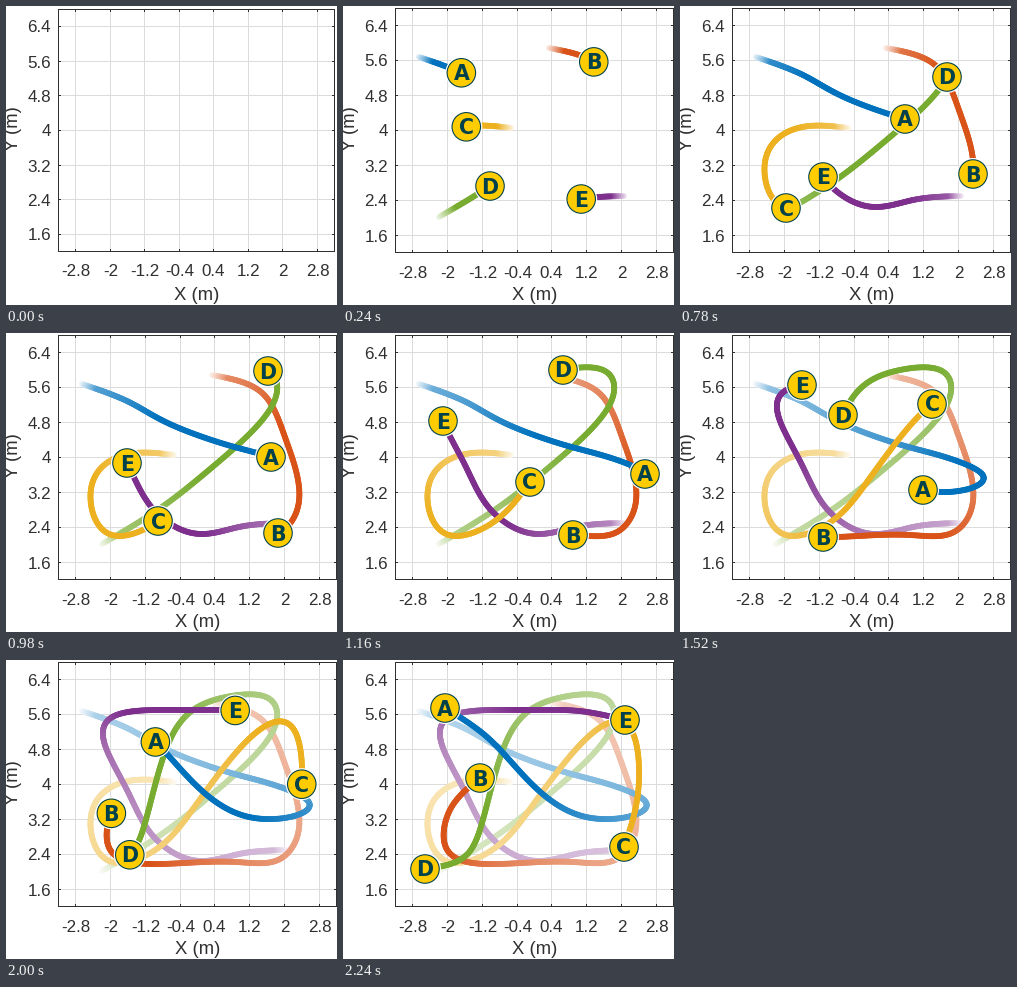
A matplotlib script that plays this animation: 331x299 px, repeating every 2300 ms.

```python
import numpy as np
import matplotlib.pyplot as plt
from matplotlib.animation import FuncAnimation
from matplotlib.collections import LineCollection
from matplotlib.colors import to_rgb
from matplotlib.patches import Circle

W, H, DPI = 331, 299, 64
PT = 72 / DPI  # points per pixel
TICK_MS, FRAMES = 20, 115
SAMPLES = 8  # trail samples per step
INK, TEAL, YELLOW = "#303030", "#00414b", "#ffcc00"

# Every robot passes its waypoints (in pixels) at these steps.
STEPS = np.array([0, 4.5, 9, 13, 16, 19, 25, 30, 33.5, 37])
ROBOTS = {
    "A": ("#0072bd", [(76, 51), (123, 69), (166, 92), (225, 113), (265, 124),
                      (302, 141), (243, 157), (180, 115), (144, 77), (102, 48)]),
    "B": ("#d95319", [(206, 42), (255, 59), (280, 107), (293, 168), (272, 200),
                      (230, 202), (143, 204), (102, 185), (108, 148), (137, 118)]),
    "C": ("#edb120", [(168, 122), (118, 122), (85, 156), (106, 202), (152, 188),
                      (187, 149), (252, 71), (291, 76), (295, 133), (281, 187)]),
    "D": ("#77ac30", [(96, 211), (153, 176), (210, 131), (267, 71), (262, 38),
                      (220, 37), (163, 82), (139, 163), (120, 198), (82, 209)]),
    "E": ("#7e2f8e", [(281, 190), (233, 194), (186, 200), (143, 171), (121, 130),
                      (100, 88), (122, 52), (187, 50), (236, 51), (282, 60)]),
}


def spline(points, t):
    """Natural cubic spline through the points at STEPS."""
    p, h = np.array(points, float), np.diff(STEPS)
    d = np.diff(p, axis=0) / h[:, None]
    w = 1 / h
    near = np.append(w, 0) + np.append(0, w)
    system = np.diag(2 * near) + np.diag(w, 1) + np.diag(w, -1)
    pull = 3 * d * w[:, None]
    zero = np.zeros((1, 2))
    slope = np.linalg.solve(system, np.vstack([pull, zero]) + np.vstack([zero, pull]))

    i = np.clip(np.searchsorted(STEPS, t, side="right") - 1, 0, len(h) - 1)
    span = h[i][:, None]
    u = (t - STEPS[i])[:, None] / span
    v = 1 - u
    return (v * v * ((1 + 2 * u) * p[i] + u * span * slope[i])
            + u * u * ((1 + 2 * v) * p[i + 1] - v * span * slope[i + 1]))


fig = plt.figure(figsize=(W / DPI, H / DPI), dpi=DPI, facecolor="white")
ax = fig.add_axes([0, 0, 1, 1])
ax.set(xlim=(0, W), ylim=(H, 0))
ax.axis("off")


def label(x, y, text, size, **style):
    return ax.text(x, y, text, fontsize=size * PT, color=INK, family="Liberation Sans",
                   va="baseline", rotation_mode="anchor", **style)


def line(x0, y0, x1, y1, color=INK):
    """One-pixel line through pixel centres."""
    return ax.plot([x0 + 0.5, x1 + 0.5], [y0 + 0.5, y1 + 0.5], color=color, lw=PT,
                   zorder=1 if color == INK else 0.5, snap=False,
                   solid_capstyle="projecting")[0]


def draw_chart(right, top, bottom, text_drop):
    left, grid = 52, "#dcdcdc"
    parts = []
    for v in np.arange(-2.8, 3, 0.8):
        x = round(left + (v + 3.2) / 6.4 * (right - left))
        parts += [line(x, top, x, bottom, grid), line(x, top, x, top + 2),
                  line(x, bottom, x, bottom - 2),
                  label(x + 0.5, 270.5 + text_drop, f"{v:.2g}", 17, ha="center")]
    for v in np.arange(1.6, 6.5, 0.8):
        y = round(bottom - (v - 1.2) / 5.6 * (bottom - top))
        parts += [line(left, y, right, y, grid), line(left, y, left + 2, y),
                  line(right, y, right - 2, y),
                  label(45, y + 6.5, f"{v:.2g}", 17, ha="right")]
    parts += [line(left, y, right, y) for y in (top, bottom)]
    parts += [line(x, top, x, bottom) for x in (left, right)]
    parts.append(label((left + right) / 2 + 1, 293.5 + text_drop, "X (m)", 18.5, ha="center"))
    parts.append(label(12, 123, "Y (m)", 18.5, ha="center", rotation=90))
    return parts


class Marker:
    def __init__(self, name, z):
        rings = [(16, "white"), (14.8, TEAL), (13.7, YELLOW)]
        self.discs = [ax.add_patch(Circle((0, 0), r, fc=c, ec="none", zorder=z))
                      for r, c in rings]
        self.text = ax.text(0, 0, name, fontsize=20.5 * PT, color=TEAL, weight="bold",
                            family="DejaVu Sans", ha="center", va="baseline", zorder=z)

    def place(self, x, y, alpha):
        for disc in self.discs:
            disc.center = (x, y)
            disc.set_alpha(alpha)
        self.text.set_position((x, y + 7.5))
        self.text.set_alpha(alpha)


empty_chart = draw_chart(328, 3, 245, 0)
live_chart = draw_chart(330, 2, 246, 1)
trails = LineCollection([], linewidths=5.8 * PT, capstyle="round", zorder=3)
ax.add_collection(trails)

clock = np.linspace(0, STEPS[-1], int(STEPS[-1]) * SAMPLES + 1)
curves = [spline(points, clock) for _, points in ROBOTS.values()]
segments = np.array([np.stack([c[:-1], c[1:]], axis=1) for c in curves])
rgb = np.array([to_rgb(color) for color, _ in ROBOTS.values()])
markers = [Marker(name, 5 + i) for i, name in enumerate(ROBOTS)]


def update(frame):
    ms = frame * TICK_MS
    step = ms // 60 if ms < 860 else (ms - 20) // 60  # one step is held 20 ms longer
    for part in empty_chart:
        part.set_visible(step == 0)
    for part in live_chart:
        part.set_visible(step > 0)

    n = step * SAMPLES
    born = clock[:n]
    aged = np.minimum(1, 0.2 + 0.8 * np.exp((8 - step + born) / 13))
    strength = aged * np.minimum(1, 0.15 + born / 1.6)
    tint = 1 - strength[:, None, None] * (1 - rgb)
    # Ordered by time, so newer strokes cover older ones.
    trails.set_segments(segments[:, :n].swapaxes(0, 1).reshape(-1, 2, 2))
    trails.set_color(tint.reshape(-1, 3))
    for marker, curve in zip(markers, curves):
        marker.place(*curve[n], min(1, step / 3))
    return []


anim = FuncAnimation(fig, update, frames=FRAMES, interval=TICK_MS, init_func=lambda: [],
                     repeat=True, repeat_delay=0, blit=False)
plt.show()
```
